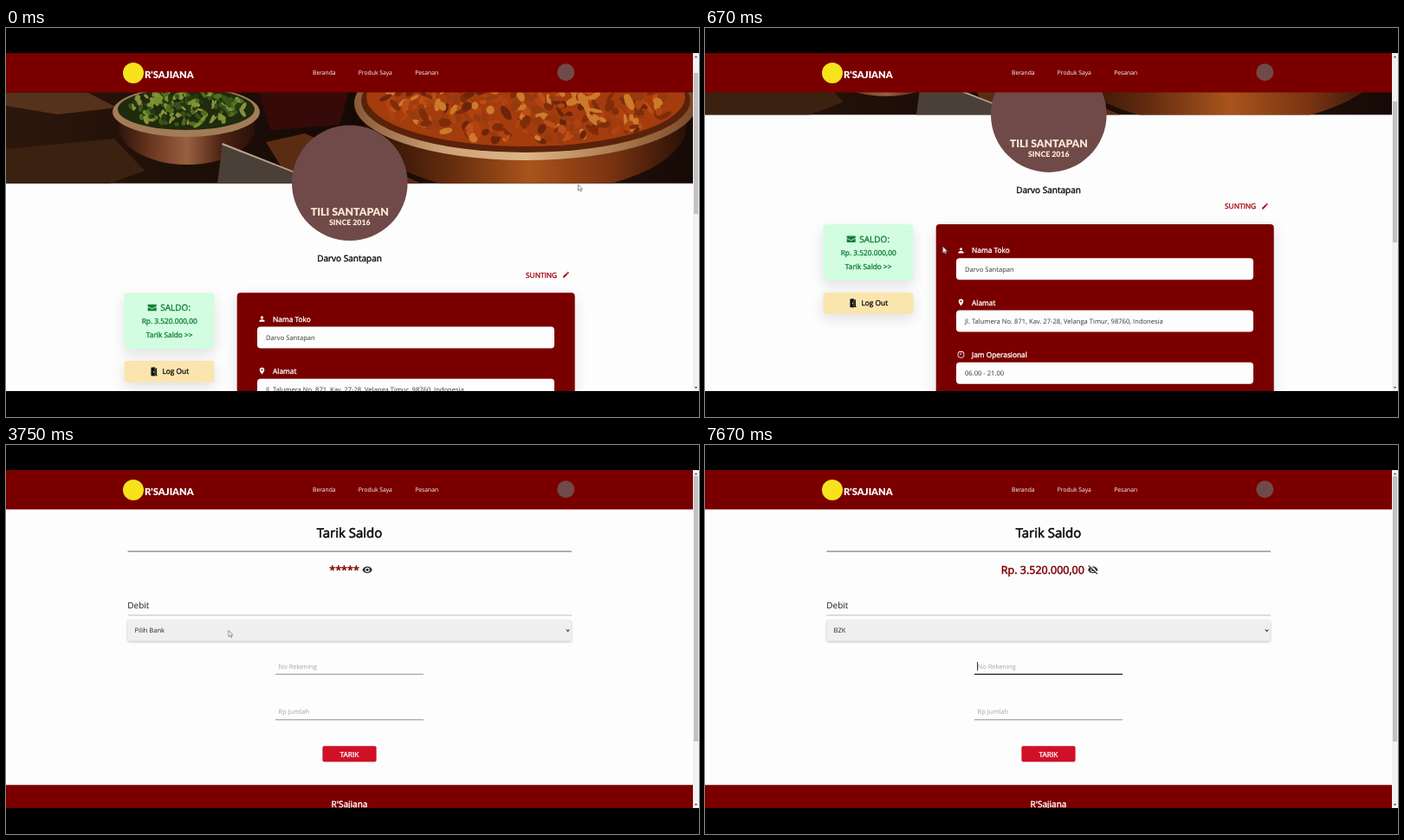
An HTML page with a canvas that plays this animation: 800x450 px, repeating every 8000 ms.

```html
<!DOCTYPE html>
<html lang="id">
<head>
<meta charset="utf-8">
<title>Tarik Saldo</title>
<style>
html, body { margin: 0; width: 100%; height: 100%; overflow: hidden; background: #000; }
canvas { display: block; width: 800px; height: 450px; }
</style>
</head>
<body>
<canvas id="stage" width="800" height="450"></canvas>
<script>
const ctx = document.getElementById('stage').getContext('2d');
ctx.textRendering = 'geometricPrecision';
const LOOP = 8000, STEP = 1000 / 12;
const SANS = '"Open Sans", "Noto Sans", sans-serif';
const MAROON = '#7a0000', PAGE = '#fefdfe', BROWN = '#704a48', CREAM = '#fbe6d5';
const BRAND = "R'Sajiana", SHOP = 'Darvo Santapan', BALANCE = 'Rp. 3.520.000,00';

const ICON = {
  eye: 'M12 4.5C7 4.5 2.7 7.6 1 12c1.7 4.4 6 7.5 11 7.5s9.3-3.1 11-7.5c-1.7-4.4-6-7.5-11-7.5zM12 17a5 5 0 110-10 5 5 0 010 10zm0-8a3 3 0 100 6 3 3 0 000-6z',
  person: 'M12 12a4 4 0 100-8 4 4 0 000 8zm0 2c-2.7 0-8 1.3-8 4v2h16v-2c0-2.7-5.3-4-8-4z',
  pin: 'M12 2a7 7 0 00-7 7c0 5.3 7 13 7 13s7-7.7 7-13a7 7 0 00-7-7zm0 9.5a2.5 2.5 0 110-5 2.5 2.5 0 010 5z',
  pencil: 'M3 17.2V21h3.8L17.8 9.9l-3.7-3.7zM20.7 7a1 1 0 000-1.4l-2.3-2.3a1 1 0 00-1.4 0l-1.9 1.8 3.8 3.8z',
  mail: 'M22 6c0-1.1-.9-2-2-2H4c-1.1 0-2 .9-2 2v12c0 1.1.9 2 2 2h16c1.1 0 2-.9 2-2zm-2 0l-8 5-8-5zm0 12H4V8l8 5 8-5z',
  phone: 'M20 15.5c-1.2 0-2.4-.2-3.6-.6a1 1 0 00-1 .3l-2.2 2.2a15 15 0 01-6.6-6.6l2.2-2.2a1 1 0 00.3-1C8.7 6.4 8.5 5.2 8.5 4c0-.5-.5-1-1-1H4c-.5 0-1 .5-1 1a17 17 0 0017 17c.6 0 1-.4 1-1v-3.5c0-.5-.4-1-1-1zM12 3v10l3-3h6V3z',
  clock: 'M12 2a10 10 0 100 20 10 10 0 000-20zm0 2a8 8 0 110 16 8 8 0 010-16zM11 6.5h1.7v6.2H7.5V11H11z',
  briefcase: 'M1 5h22v5l-11 5L1 10zM1 12l11 5 11-5v9H1z',
  door: 'M5 1l10-1v24L5 23zM16 3h4v18h2v2h-6zM11 11v3h2v-3z',
  swap: 'M12 0a12 12 0 100 24 12 12 0 000-24zm0 2.4a9.6 9.6 0 110 19.2 9.6 9.6 0 010-19.2zM6 9l4-4v3h8v2zM18 15l-4 4v-3H6v-2z',
  wallet: 'M2 1h18v5h2v16H2zM4 6h14V3H4zM4 8v12h16V8zM12 9h12v9H12zM14 11v5h8v-5zM16 12h3v3h-3z'
};
for (const k in ICON) ICON[k] = new Path2D(ICON[k]);

function icon(name, cx, cy, size, color) {
  ctx.save();
  ctx.translate(cx - size / 2, cy - size / 2);
  ctx.scale(size / 24, size / 24);
  ctx.fillStyle = color;
  ctx.fill(ICON[name], 'evenodd');
  ctx.restore();
}

function rect(x, y, w, h, color, r = 0) {
  ctx.fillStyle = color;
  ctx.beginPath();
  ctx.roundRect(x, y, w, h, r);
  ctx.fill();
}

function oval(cx, cy, rx, ry, color, turn = 0) {
  ctx.fillStyle = color;
  ctx.beginPath();
  ctx.ellipse(cx, cy, rx, ry, turn, 0, Math.PI * 2);
  ctx.fill();
}

function poly(color, ...p) {
  ctx.fillStyle = color;
  ctx.beginPath();
  for (let i = 0; i < p.length; i += 2) ctx.lineTo(p[i], p[i + 1]);
  ctx.closePath();
  ctx.fill();
}

function card(x, y, w, h, color, r, blur, dy, shade) {
  ctx.save();
  ctx.shadowColor = shade;
  ctx.shadowBlur = blur;
  ctx.shadowOffsetY = dy;
  rect(x, y, w, h, color, r);
  ctx.restore();
}

// bold thickens the regular cut without changing its advance widths
function text(s, x, y, size, color, { bold, align = 'left', font = SANS, weight = 400 } = {}) {
  ctx.font = `${weight} ${size}px ${font}`;
  ctx.textAlign = align;
  ctx.fillStyle = ctx.strokeStyle = color;
  ctx.fillText(s, x, y);
  if (bold) {
    ctx.lineWidth = size * 0.04;
    ctx.lineJoin = 'round';
    ctx.strokeText(s, x, y);
  }
}

const BOLD = { bold: true }, MID = { bold: true, align: 'center' };
const LOGO = { weight: 900, font: 'Lato, "Open Sans", sans-serif' };

function header(dx) {
  rect(0, 29, 800, 45.5, MAROON);
  oval(147 + dx, 52, 12, 12, '#f7e31c');
  text(BRAND.toUpperCase(), 160 + dx, 57.5, 11.2, '#fff', LOGO);
  text('Beranda', 354 + dx, 53.7, 6.77, '#fff');
  text('Produk Saya', 406.8 + dx, 53.7, 6.77, '#fff');
  text('Pesanan', 472.2 + dx, 53.7, 6.77, '#fff');
  oval(646.3 + dx, 51.3, 10, 10, BROWN);
}

function scrollbar(top, bottom) {
  rect(793, 29, 7, 391, '#f1f1f1');
  rect(794, top, 5, bottom - top, '#c1c1c1');
  poly('#555', 794.8, 34.3, 798.2, 34.3, 796.5, 32);
  poly('#555', 794.8, 415, 798.2, 415, 796.5, 417.3);
}

function specks(n, seed, cx, cy, rx, ry, colors, size) {
  let s = seed;
  const rnd = () => (s = (s * 16807) % 2147483647) / 2147483647;
  for (let i = 0; i < n; i++) {
    const a = rnd() * Math.PI * 2, d = Math.sqrt(rnd());
    oval(cx + Math.cos(a) * d * rx, cy + Math.sin(a) * d * ry,
      size * (0.5 + rnd()), size * (0.3 + rnd() * 0.5), colors[Math.floor(rnd() * colors.length)], rnd() * 3);
  }
}

function sweep(x0, x1, ...colors) {
  const g = ctx.createLinearGradient(x0, 0, x1, 0);
  colors.forEach((c, i) => g.addColorStop(i / (colors.length - 1), c));
  return g;
}

function banner() {
  ctx.save();
  ctx.beginPath();
  ctx.rect(0, 60, 793, 119.7);
  ctx.clip();
  rect(0, 60, 793, 120, sweep(0, 793, '#2c170c', '#1f0f08', '#150906', '#2a1208', '#160a06'));
  poly('#56321a', 0, 75, 95, 75, 128, 92, 60, 100, 0, 90);
  poly('#3a2110', 0, 140, 125, 128, 160, 165, 120, 180, 0, 180);
  poly('#360a09', 292, 75, 395, 75, 385, 112, 305, 118);
  poly('#5a2d13', 300, 132, 345, 122, 480, 180, 330, 180);
  // small copper bowl
  oval(209, 114, 79, 44, sweep(128, 290, '#2b120a', '#6b3820', '#98603f', '#4c2213', '#250f08'));
  oval(208, 97, 85, 29, '#a27c58');
  oval(208, 94, 79, 24, '#202a0c');
  specks(170, 71, 208, 92, 70, 21, ['#4d701d', '#768f30', '#39521a', '#8a9040', '#26380f'], 4);
  // tilted slate
  poly('#4b4038', 250, 133, 338, 168, 342, 180, 244, 180);
  poly('#b8a58f', 250, 133, 338, 168, 339, 170, 249, 135);
  // large pan
  oval(600, 112, 186, 80, sweep(420, 790, '#2b1006', '#642c0f', '#a9541c', '#7a3311', '#240e06'));
  oval(600, 87, 198, 66, sweep(405, 793, '#8a5b3a', '#caa276', '#dcb68a', '#b07f52', '#7b4a2a'));
  oval(600, 84, 190, 60, '#5a210b');
  oval(600, 80, 184, 57, '#a43c0d');
  specks(330, 913, 602, 84, 172, 48, ['#7f2c0b', '#bd4e17', '#cc7a2b', '#963a10', '#b0430f', '#6c240a'], 6.5);
  ctx.restore();
}

function field(y, sym, label, value) {
  icon(sym, 295.5, y, 9.5, '#fff');
  text(label, 308, y + 3, 8.33, '#fff', BOLD);
  rect(290, y + 9, 343, 25, PAGE, 4);
  text(value, 300, y + 24.3, 7.6, '#333');
}

function profile(scroll) {
  ctx.save();
  ctx.translate(0, -scroll);
  banner();
  oval(396.8, 179.3, 66.8, 66.8, BROWN);
  text('TILI SANTAPAN', 396.8, 217, 12.3, CREAM, { ...LOGO, align: 'center' });
  text('SINCE 2016', 396.8, 228, 8.8, CREAM, { ...LOGO, align: 'center' });
  text(SHOP, 396.5, 270, 10, '#111', MID);
  text('SUNTING', 600, 288.5, 8.33, '#a3000f', BOLD);
  icon('pencil', 646.5, 285.3, 9, '#a3000f');

  const green = '#157f3c', shade = 'rgba(0,0,0,.12)';
  card(136.5, 306.5, 104, 65, '#d2fde0', 4, 15, 5, shade);
  icon('briefcase', 168.7, 323, 11, green);
  text('SALDO:', 178.3, 326.7, 10, green, BOLD);
  text(BALANCE, 188.7, 342, 8.33, green, MID);
  text('Tarik Saldo >>', 188.7, 358.3, 8.33, green, MID);
  card(136.5, 385, 104, 25, '#fbe5ae', 4, 15, 5, shade);
  icon('door', 170.5, 397.5, 10.5, '#111');
  text('Log Out', 180.5, 400.3, 8.33, '#111', BOLD);

  card(266.7, 306.3, 390, 300, MAROON, 4, 16, 5, shade);
  field(336.5, 'person', 'Nama Toko', SHOP);
  field(396.7, 'pin', 'Alamat', 'Jl. Talumera No. 871, Kav. 27-28, Velanga Timur, 98760, Indonesia');
  field(457, 'clock', 'Jam Operasional', '06.00 - 21.00');
  ctx.restore();
  header(0);
  const shift = scroll * 0.417;
  scrollbar(52 + shift, 215 + shift);
}

function stroke(color, width, ...p) {
  ctx.strokeStyle = color;
  ctx.lineWidth = width;
  ctx.beginPath();
  for (let i = 0; i < p.length; i += 2) ctx.lineTo(p[i], p[i + 1]);
  ctx.stroke();
}

// title, balance and section heading, shared by both withdrawal pages
function balanceTop(dx, section, shown) {
  text('Tarik Saldo', 400 + dx, 106.5, 15, '#0c0c0c', MID);
  rect(144 + dx, 122.2, 512.5, 1.7, '#a6a4a8');
  text(shown ? BALANCE : '*****', (shown ? 345.3 : 376.8) + dx, 149, 12.5, MAROON, BOLD);
  const ex = (shown ? 451.3 : 420.6) + dx, ey = 144.4;
  icon('eye', ex, ey, 12.5, '#2d3338');
  if (shown) {
    stroke(PAGE, 1.3, ex - 4, ey - 5.4, ex + 6, ey + 4);
    stroke('#2d3338', 1.2, ex - 5.2, ey - 5, ex + 5.2, ey + 5);
  }
  text(section, 143.8 + dx, 188.7, 10, '#1a1a1a');
  rect(144 + dx, 196.5, 512.5, 1.1, '#bcbabd');
}

function row(y, sym, label) {
  card(144, y, 512, 20, '#f1f0f1', 1, 3, 1, 'rgba(0,0,0,.25)');
  icon(sym, 155.7, y + 9.7, 12, '#9c0d1c');
  text(label, 165.8, y + 12.8, 8.33, '#222');
}

function methods(shown) {
  header(3.5);
  balanceTop(0, 'Tarik Saldo', shown);
  row(206, 'swap', 'Debit');
  row(234.3, 'wallet', 'E-Money');
  rect(0, 303.7, 800, 100, MAROON);
  rect(0, 403.3, 800, 17, '#c90000');
  text(BRAND, 400, 330, 10, '#fff', MID);
  const pale = '#eadada', mid = { align: 'center' };
  text('Jelajahi dunia rasa yang tak terbatas dan hadirkan kelezatan sempurna ke setiap acaramu dengan', 400, 345.2, 8.33, pale, mid);
  text('Rsajiana.', 400, 356.6, 8.33, pale, mid);
  rect(304, 366, 192, 1, '#c79a9a');
  icon('phone', 380, 381.2, 13, '#fff');
  rect(394.7, 375.9, 10.6, 10.6, '#fff', 1);
  icon('mail', 420, 381.2, 13, '#fff');
  text('Copyright ©2023 ' + BRAND, 400, 413.9, 6.67, '#fff', mid);
}

function debit({ shown, bank, ring, caret }) {
  header(0);
  balanceTop(-3.5, 'Debit', shown);
  card(140.5, 202.5, 512, 24.3, '#f0eff0', 1.5, 3, 1, 'rgba(0,0,0,.25)');
  if (ring) {
    ctx.strokeStyle = '#111';
    ctx.lineWidth = 1.3;
    ctx.beginPath();
    ctx.roundRect(140.5, 202.3, 512.3, 24.4, 1.5);
    ctx.stroke();
  }
  text(bank, 148.6, 217.3, 7.5, '#222');
  stroke('#222', 1.1, 646.8, 213.5, 648.6, 215.5, 650.4, 213.5);
  text('No Rekening', 314.6, 258.6, 7.5, '#a5a3a6');
  rect(311, 264.5, 171, 1.4, caret ? '#3c3c3c' : '#b3b1b4');
  if (caret) rect(314, 251, 0.9, 10, '#222');
  text('Rp Jumlah', 314.6, 311.2, 7.5, '#a5a3a6');
  rect(311, 317, 171, 1.4, '#b3b1b4');
  rect(365.4, 348.3, 62.2, 18.3, '#d01027', 2);
  text('TARIK', 396.5, 360.5, 8.33, '#fff', MID);
  rect(0, 393.3, 793, 30, MAROON);
  text(BRAND, 396.5, 419.3, 10, '#fff', MID);
  scrollbar(36, 343);
}

const SCROLL = [[0, 0], [250, 79.2]];
const POINTER = [
  [0, 660.5, 181], [80, 659, 182], [250, 649, 186], [830, 185, 269], [1500, 185, 269],
  [2250, 420, 143], [2500, 420, 143], [2920, 418.6, 163], [3080, 400, 172], [3330, 250, 214],
  [3580, 250, 214], [4420, 315, 219], [4670, 315, 219], [5000, 310, 216],
  [5750, 310, 216], [6330, 421, 152], [6500, 417, 143], [6670, 417, 143], [7080, 345, 256]
];

function at(keys, t) {
  const i = keys.findIndex(k => k[0] > t);
  if (i < 0) return keys[keys.length - 1].slice(1);
  const a = keys[i - 1], b = keys[i];
  const u = (t - a[0]) / (b[0] - a[0]), e = u * u * (3 - 2 * u);
  return a.slice(1).map((v, n) => v + (b[n + 1] - v) * e);
}

const ARROW = new Path2D('M0 0V7.2L1.7 5.7 2.8 8.2 3.9 7.7 2.8 5.3H5z');
const HAND = new Path2D('M0 1q1-1.2 1.8 0V4L5 4.8Q6 5 5.8 6.5L5 9.5H.7L-2 6.3Q-1.8 5 0 6z');

function pointer(t) {
  if (t >= 7000) return;
  const over = (a, b) => t >= a && t < b;
  const hand = over(800, 1600) || over(2200, 2450) || over(3300, 3580) || over(6450, 6700);
  const [x, y] = at(POINTER, t), shape = hand ? HAND : ARROW;
  ctx.save();
  ctx.translate(x, y);
  ctx.fillStyle = '#fff';
  ctx.strokeStyle = '#77757a';
  ctx.lineWidth = 0.8;
  ctx.fill(shape);
  ctx.stroke(shape);
  ctx.restore();
}

function draw(t) {
  rect(0, 0, 800, 450, '#000');
  ctx.save();
  ctx.beginPath();
  ctx.rect(0, 29, 800, 391);
  ctx.clip();
  rect(0, 29, 800, 391, PAGE);
  if (t < 1245) profile(at(SCROLL, t)[0]);
  else if (t < 3575) methods(t >= 2410);
  else debit({
    shown: t >= 6660,
    bank: t >= 5825 ? 'BZK' : 'Pilih Bank',
    ring: t >= 4910 && t < 6660,
    caret: t >= 7660
  });
  pointer(t);
  ctx.restore();
}

function tick(now) {
  const t = now % LOOP;
  draw(Math.floor((t + 4) / STEP) * STEP);
  requestAnimationFrame(tick);
}
requestAnimationFrame(tick);
</script>
</body>
</html>
```
